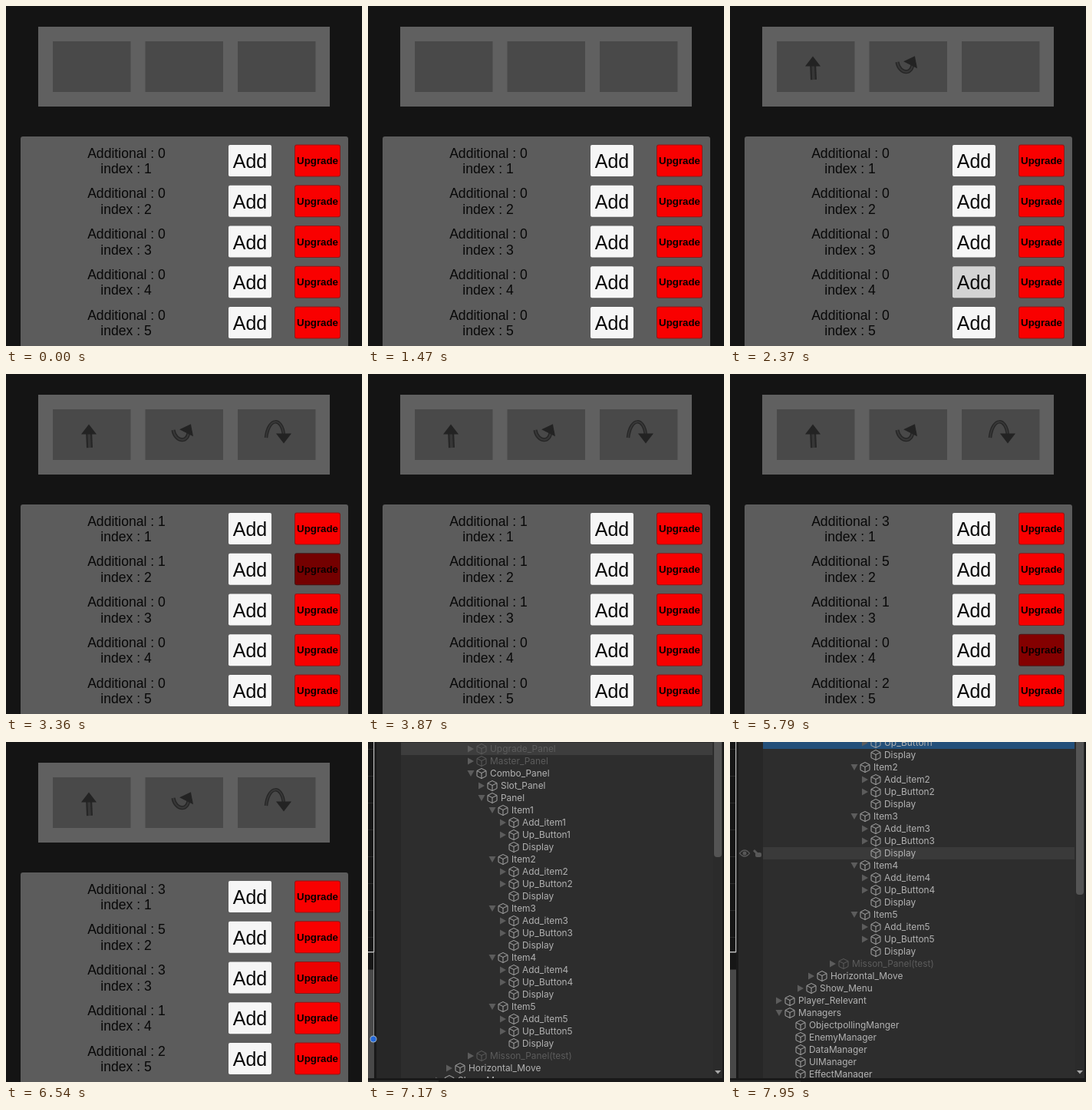
Write an HTML page with a canvas that moves like this. It is 464 px wide and 443 px high and loops after 8000 ms.

```html
<!DOCTYPE html>
<html lang="en">
<head>
<meta charset="utf-8">
<style>
  html, body { margin: 0; width: 100%; height: 100%; overflow: hidden; background: #141414; }
  canvas { display: block; }
</style>
</head>
<body>
<canvas id="stage" width="464" height="443"></canvas>
<script>
const ctx = document.getElementById('stage').getContext('2d');
const LOOP = 8000, TREE_AT = 7170, HOVER_AT = 7320, PICK_AT = 7590, SCROLL_AT = 7830;
const FADE = 110, ROW_H = 16, VIEW_H = 438;
const SANS = '"Liberation Sans", Arial, sans-serif';
const UI = 'Inter, sans-serif';

const click = (row, down, gain = 1, hold = 160) => ({ row, down, gain, up: down + hold });
const adds = [click(0, 1470, 1, 90), click(1, 1860, 1, 90), click(3, 2280, 1, 120)];
const upgrades = [
  click(0, 600, 0, 290), click(0, 2730), click(1, 3195), click(2, 3480), click(1, 4090, 4),
  click(0, 4475), click(0, 4860), click(4, 5160, 2), click(3, 5700), click(2, 6120, 2, 320)
];

const clamp = v => Math.max(0, Math.min(1, v));
const mix = (a, b, k) => Math.round(a + (b - a) * k);
const grey = v => `rgb(${v},${v},${v})`;
const sum = list => list.reduce((n, c) => n + c.gain, 0);

function rect(x, y, w, h, color, r = 0) {
  ctx.fillStyle = color;
  ctx.beginPath();
  ctx.roundRect(x, y, w, h, r);
  ctx.fill();
}

function stroke(path, color, width) {
  ctx.strokeStyle = color;
  ctx.lineWidth = width;
  ctx.stroke(new Path2D(path));
}

// Triangle centred on x, y, pointing along +x before the turn
function triangle(x, y, length, width, color, turn = 0) {
  ctx.save();
  ctx.translate(x, y);
  ctx.rotate(turn);
  ctx.fillStyle = color;
  ctx.fill(new Path2D(`M${length / 2} 0 L${-length / 2} ${width / 2} v${-width} z`));
  ctx.restore();
}

function text(str, x, y, font, color, align = 'center') {
  ctx.font = font;
  ctx.fillStyle = color;
  ctx.textAlign = align;
  ctx.fillText(str, x, y);
}

function pressure(clicks, row, t) {
  const levels = clicks.filter(c => c.row === row)
    .map(c => clamp((t - c.down) / FADE) * (1 - clamp((t - c.up) / FADE)));
  return Math.max(0, ...levels);
}

// Ribbon arrow: dark band with a lighter inner face and a head
function arrow(path, width, x, y, turn) {
  stroke(path, '#262626', width);
  stroke(path, '#373737', width * 0.45);
  triangle(x, y, 13, 20, '#232323', turn);
}

const arrows = [
  () => arrow('M109 96 L108 74', 8, 108, 72, -Math.PI / 2),
  () => arrow('M218 73 C221 90 239 90 238 73', 5, 238, 71, -1.1),
  () => arrow('M339 83 C342 56 360 56 362 80', 4.5, 362, 84, Math.PI / 2)
];

function drawGame(t) {
  rect(0, 0, 464, 443, '#141414');
  rect(42, 27, 380, 104, '#606060');
  for (let i = 0; i < 3; i++) rect(61 + i * 120.5, 46, 101.5, 66, '#494949');
  adds.forEach((c, i) => t >= c.up && arrows[i]());

  rect(19, 170, 427, 290, '#5c5c5c', 3);
  for (let i = 0; i < 5; i++) {
    const y = 181 + i * 52.75;
    const points = sum(upgrades.filter(c => c.row === i && t >= c.up));
    text(`Additional : ${points}`, 157, y + 16.5, `17.6px ${SANS}`, '#080808');
    text(`index : ${i + 1}`, 156.5, y + 37, `17.6px ${SANS}`, '#080808');

    rect(290, y, 56, 41, grey(mix(246, 204, pressure(adds, i, t))), 2);
    text('Add', 318, y + 30, `25px ${SANS}`, '#080808');

    const red = mix(249, 108, pressure(upgrades, i, t));
    rect(376, y - 0.5, 60, 42, `rgb(${mix(0, red, 0.6)},20,20)`, 3);
    rect(377, y + 0.5, 58, 40, `rgb(${red},0,0)`, 2);
    text('Upgrade', 406, y + 25, `bold 13.3px ${SANS}`, '#0a0000');
  }
}

const tree = [];
const branch = (depth, fold, names, dim = false) =>
  names.split(' ').forEach(label => tree.push({ label, x: 47 + depth * 14, fold, dim }));

branch(8, 'closed', 'Upgrade_Panel Master_Panel', true);
branch(8, 'open', 'Combo_Panel');
branch(9, 'closed', 'Slot_Panel');
branch(9, 'open', 'Panel');
for (let i = 1; i <= 5; i++) {
  branch(10, 'open', `Item${i}`);
  branch(11, 'closed', `Add_item${i} Up_Button${i}`);
  branch(11, 'none', 'Display');
}
branch(8, 'closed', 'Misson_Panel(test)', true);
branch(6, 'closed', 'Horizontal_Move');
branch(5, 'closed', 'Show_Menu');
branch(3, 'closed', 'Player_Relevant');
branch(3, 'open', 'Managers');
branch(4, 'none', 'ObjectpollingManger EnemyManager DataManager UIManager EffectManager');
const picked = tree.findIndex(row => row.label === 'Up_Button1');

function cube(x, y, color) {
  stroke(`M${x} ${y - 6.5} l6 3 v7 l-6 3 l-6 -3 v-7 z m-6 3 l6 3 l6 -3 m-6 3 v7`, color, 1);
}

function rowIcons(y) {
  const color = '#585858';
  stroke(`M12.5 ${y} q6.5 -8 13 0 q-6.5 8 -13 0 z`, color, 1.3);
  rect(16.5, y - 2.5, 5, 5, color, 2.5);
  rect(33, y - 1, 8, 6, color, 2);
  stroke(`M31 ${y - 4} l5 5`, color, 3);
}

function drawRow({ label, x, fold, dim }, y) {
  const color = dim ? '#5c5c5c' : '#b2b2b2';
  if (fold !== 'none') triangle(x - 25, y, 8, 9, '#5c5c5c', fold === 'open' ? Math.PI / 2 : 0);
  cube(x - 11, y, dim ? color : '#a6a6a6');
  text(label, x, y + 4.3, `11.9px ${UI}`, color, 'left');
}

function drawSceneEdge(scrolled) {
  rect(0, 0, 8, 296, '#161616');
  for (let y = 9; y < 270; y += 35) rect(0, y, 7, 1, '#2b2b2b');
  rect(0, 297, 9, 141, '#484848');
  rect(8, 0, 3, VIEW_H, '#191919');
  rect(7, 0, 1.3, 274, '#b5b5b5');
  rect(0, 273, 8, 1.4, '#c5c5c5');
  if (scrolled) return;
  rect(7, 274, 1, 113, '#8a8a8a');
  rect(2.5, 382.5, 9, 9, '#9fb4cc', 4.5);
  rect(3.5, 383.5, 7, 7, '#2468d8', 3.5);
}

function drawTree(t) {
  const scroll = t < SCROLL_AT ? 0 : 30 * Math.min(4, 1 + Math.floor((t - SCROLL_AT) / 40));
  const pointer = scroll ? 140 : 121;
  const hover = t < HOVER_AT ? -1 : Math.floor((pointer + scroll - 1) / ROW_H);

  rect(0, 0, 464, 443, '#2d2d2d');
  rect(11, 0, 32, VIEW_H, '#272727');
  ctx.save();
  ctx.beginPath();
  ctx.rect(11, 0, 439, VIEW_H);
  ctx.clip();
  tree.forEach((row, i) => {
    const y = 9 + i * ROW_H - scroll;
    const back = t >= PICK_AT
      ? (i === picked ? '#24507a' : i === hover && '#3a3a3a')
      : i === 0 && '#3d3d3d';
    if (back) rect(43, y - 8, 406, ROW_H, back);
    if (i === hover) rowIcons(y);
    drawRow(row, y);
  });
  ctx.restore();

  rect(450, 0, 12, VIEW_H, '#2b2b2b');
  rect(451, -20, 10, 170 + scroll * 0.408, '#545454', 4);
  triangle(456, 430.3, 4.5, 8, '#a8a8a8', Math.PI / 2);
  rect(462, 0, 2, 443, '#191919');
  drawSceneEdge(scroll > 0);
  rect(0, VIEW_H, 464, 5, '#191919');
  rect(0, 441, 92, 2, '#303030');
}

function frame(now) {
  const t = now % LOOP;
  if (t < TREE_AT) drawGame(t);
  else drawTree(t);
  requestAnimationFrame(frame);
}
requestAnimationFrame(frame);
</script>
</body>
</html>
```
